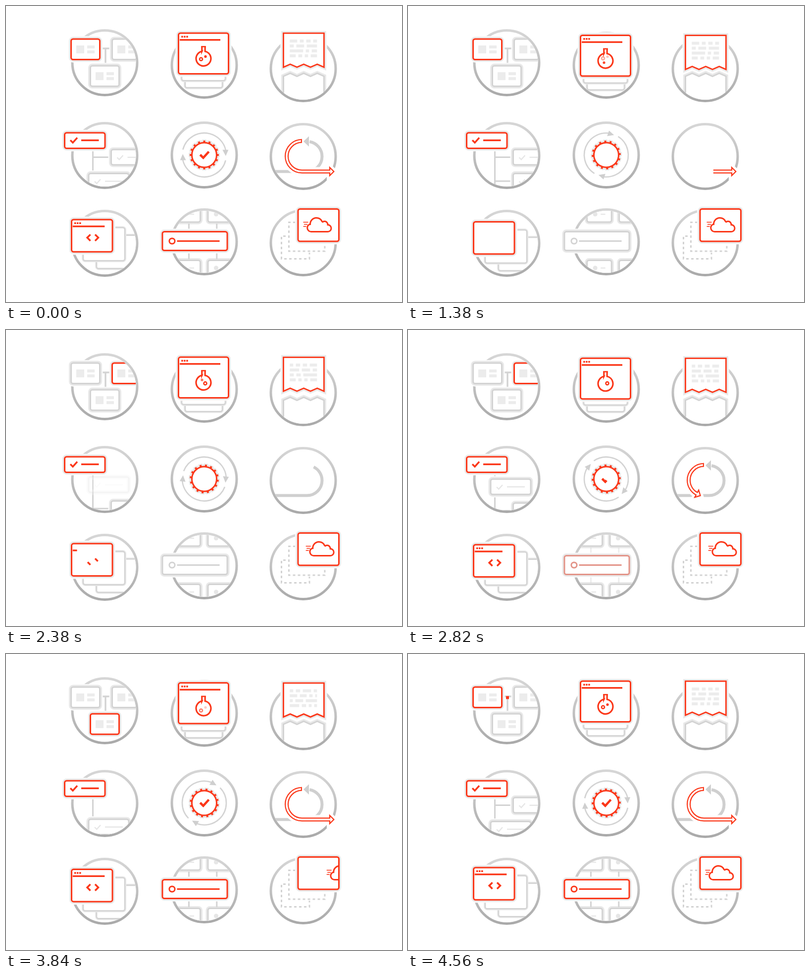
Recreate the animation shown at these times as an HTML page with a canvas. Size 800 by 600 pixels, loop 4580 ms.

```html
<!DOCTYPE html>
<html lang="en">
<head>
<meta charset="utf-8">
<title>Line icons</title>
<style>
html, body { margin: 0; width: 100%; height: 100%; overflow: hidden; background: #fff; }
canvas { display: block; width: 800px; height: 600px; }
</style>
</head>
<body>
<canvas id="stage" width="800" height="600"></canvas>
<script>
const ctx = document.getElementById('stage').getContext('2d');
const LOOP = 4580, TAU = Math.PI * 2, RAD = Math.PI / 180;
const RED = '#fb3719', GREY = '#d3d3d3', PALE = '#ececec', HALO = '#e9e9e9', WHITE = '#fff';

const ramp = (t, a, b) => Math.min(1, Math.max(0, (t - a) / (b - a)));
const ease = (t, a, b) => { const k = ramp(t, a, b); return k * k * (3 - 2 * k); };
const lerp = (a, b, k) => a + (b - a) * k;
const tint = k => `rgb(${lerp(211, 251, k)},${lerp(211, 55, k)},${lerp(211, 25, k)})`;
const bob = (t, lag = 0) => 2.5 * (1 - Math.cos(TAU * (t * 2 / LOOP - lag)));

function keyed(t, keys) {
  let i = 1;
  while (i < keys.length - 1 && t > keys[i][0]) i++;
  const [a, from] = keys[i - 1], [b, to] = keys[i];
  return lerp(from, to, ramp(t, a, b));
}

function scoped(draw) {
  ctx.save();
  draw();
  ctx.restore();
}

function stroke(color, width) {
  ctx.strokeStyle = color;
  ctx.lineWidth = width;
  ctx.stroke();
}

function line(points, color, width) {
  ctx.beginPath();
  points.forEach(([x, y]) => ctx.lineTo(x, y));
  stroke(color, width);
}

// Strokes only the stretch of the path between two lengths.
function stretch(path, from, to, color, width) {
  if (to <= from) return;
  scoped(() => {
    ctx.setLineDash([to - from, 9999]);
    ctx.lineDashOffset = -from;
    ctx.beginPath();
    path();
    stroke(color, width);
  });
}

function box(x, y, w, h, color) {
  ctx.fillStyle = color;
  ctx.fillRect(x, y, w, h);
}

function disc(x, y, r, color) {
  ctx.fillStyle = color;
  ctx.beginPath();
  ctx.arc(x, y, r, 0, TAU);
  ctx.fill();
}

function circle(x, y, r, color, width) {
  ctx.beginPath();
  ctx.arc(x, y, r, 0, TAU);
  stroke(color, width);
}

function outlined(path, color, width = 3, halo = 9, gap = 12) {
  ctx.beginPath();
  path();
  if (gap) stroke(WHITE, gap);
  stroke(HALO, halo);
  ctx.fillStyle = WHITE;
  ctx.fill();
  stroke(color, width);
}

const panel = (x, y, w, h, color) => outlined(() => ctx.roundRect(x, y, w, h, 4), color);
const backCard = (x, y, w, h) => outlined(() => ctx.roundRect(x, y, w, h, 4), GREY, 2.6, 6, 0);

function ring(cx, cy) {
  const shade = ctx.createLinearGradient(0, cy - 68, 0, cy + 68);
  shade.addColorStop(0, '#d7d7d7');
  shade.addColorStop(1, '#a9a9a9');
  circle(cx, cy, 65.5, shade, 5);
}

function inside(cx, cy, draw) {
  scoped(() => {
    ctx.beginPath();
    ctx.arc(cx, cy, 63, 0, TAU);
    ctx.clip();
    draw();
  });
}

function tick(x, y, size, color, width, shown = 1) {
  stretch(() => {
    ctx.moveTo(x - 7 * size, y);
    ctx.lineTo(x - 2 * size, y + 5 * size);
    ctx.lineTo(x + 7 * size, y - 5 * size);
  }, 0, 21 * size * shown, color, width);
}

function titleBar(x, y, length, dots) {
  scoped(() => {
    ctx.globalAlpha = dots;
    for (let i = 0; i < 3; i++) box(x + 6.2 + i * 5, y + 5.5, 3.5, 3.5, RED);
  });
  if (length > 0) box(x + 3, y + 12, length, 3.4, RED);
}

function network(t) {
  const cx = 199.5, cy = 115;
  const ab = ramp(t, 1540, 1680), bc = ramp(t, 3030, 3170), ca = ramp(t, 4380, 4500);
  const card = (x, y, k) => {
    panel(x, y, 58, 41.5, tint(k));
    box(x + 10.5, y + 13, 16, 16, PALE);
    box(x + 32.5, y + 13, 15, 6, PALE);
    box(x + 32.5, y + 23, 15, 6, PALE);
  };
  const dot = (x, y) => box(x - 3, y - 3, 6, 6, RED);
  ring(cx, cy);
  inside(cx, cy, () => {
    line([[190, 86], [214, 86]], GREY, 3.4);
    line([[201, 86], [201, 120]], GREY, 3.4);
    if (t > 1560 && t < 1760) dot(lerp(188, 216, ramp(t, 1560, 1760)), 86);
    if (t > 3050 && t < 3300) {
      const way = 50 * ramp(t, 3050, 3300);
      dot(Math.max(201, 215 - way), 86 + Math.max(0, way - 14));
    }
    if (t > 4410) dot(201, lerp(121, 86, ramp(t, 4410, 4572)));
    card(214.5, 67, ab * (1 - bc));
    card(170.5, 121.2, bc * (1 - ca));
  });
  card(131.5, 67, Math.max(1 - ab, ca));
}

function bubble(t, start, life, x, fromY, toY, hollow) {
  const k = ((t - start + LOOP) % LOOP) / life;
  if (k > 1) return;
  scoped(() => {
    ctx.globalAlpha = Math.min(1, k / 0.15, (1 - k) / 0.13);
    const y = lerp(fromY, toY, k);
    if (hollow) circle(x, y, 3, RED, 2.6);
    else disc(x, y, 2.6, RED);
  });
}

function flaskWindow(t) {
  ring(400.5, 120);
  const low = bob(t, 0.12), mid = bob(t, 0.08);
  inside(400.5, 120, () => {
    backCard(362, 115 + low, 75, 50);
    backCard(355, 100 + mid, 88, 51);
  });
  scoped(() => {
    ctx.translate(0, bob(t));
    panel(348.5, 55, 101, 82.5, RED);
    titleBar(348, 55, 82, 1);
    ctx.beginPath();
    ctx.moveTo(395.8, 82);
    ctx.lineTo(395.8, 92);
    ctx.arc(399, 106.5, 15, -102 * RAD, -78 * RAD, true);
    ctx.lineTo(402.2, 82);
    stroke(RED, 3.2);
    line([[394.2, 82.3], [403.8, 82.3]], RED, 2.6);
    bubble(t, 3600, 2500, 394, 112, 101, true);
    bubble(t, 3750, 2300, 403, 105, 98, false);
    bubble(t, 1200, 1300, 396, 112, 100, false);
    bubble(t, 1900, 1500, 402.5, 110.5, 103, true);
  });
}

// Gap positions of the four text rows, for each of three texts.
const TEXTS = [
  [[15, 28, 42], [8, 29, 55], [27, 39, 55], [12, 25, 37]],
  [[7, 21, 35], [19, 41, 55], [8, 22, 55], [12, 24, 36]],
  [[7, 21, 43], [15, 34, 46], [6, 27, 55], [19, 33, 44]]
];

function tornEdge(y, toRight) {
  for (let i = 0; i <= 6; i++) {
    const n = toRight ? i : 6 - i;
    ctx.lineTo(560.5 + n * 13.65, y - (n % 2) * 6);
  }
}

function receipt(t) {
  ring(600.5, 127);
  inside(600.5, 127, () => outlined(() => {
    ctx.moveTo(560.5, 210);
    tornEdge(142.5, true);
    ctx.lineTo(642.4, 210);
  }, GREY, 3, 9, 0));
  scoped(() => {
    ctx.translate(0, bob(t));
    outlined(() => {
      ctx.moveTo(560.5, 55.2);
      ctx.lineTo(642.4, 55.2);
      tornEdge(124, false);
      ctx.closePath();
    }, RED, 2.8);
    const [a, b, c] = [ease(t, 1650, 1950), ease(t, 2750, 3050), ease(t, 4100, 4400)];
    for (let row = 0; row < 4; row++) {
      let x = 0;
      for (let i = 0; i < 4; i++) {
        const [p, q, r] = TEXTS.map(text => i < 3 ? text[row][i] : 55);
        const end = lerp(lerp(lerp(p, q, a), r, b), p, c);
        if (end > x) box(573.3 + x, 68 + row * 10, end - x, 6, PALE);
        x = end + 5.3;
      }
    }
  });
}

const SCROLL = [[0, 0], [200, 10], [640, 37], [1000, 47], [1300, 48.5], [1500, 48.5], [2200, 95],
  [2380, 104], [2900, 109], [3280, 118], [3840, 141], [4150, 145.5], [4580, 145.5]];

function taskTree(t) {
  const cx = 199.5, cy = 303, shift = keyed(t, SCROLL);
  const fades = [1, ramp(t, 1050, 1350), ramp(t, 2310, 2700), ramp(t, 4150, 4450)];
  ring(cx, cy);
  inside(cx, cy, () => {
    line([[175.5, 285], [175.5, 375]], GREY, 3);
    for (let i = -2; i <= 3; i++) {
      const y = 291 + shift - i * 48.5, left = (i + 3) % 3 === 2, x = left ? 167 : 212.5;
      scoped(() => {
        ctx.globalAlpha = i > 0 ? fades[i] : 1;
        if (!left) line([[176, y + 15.5], [211, y + 15.5]], GREY, 3);
        panel(x, y, 81, 31, GREY);
        tick(x + 18, y + 16, 0.85, '#e6e6e6', 2.4);
        box(x + 33, y + 14.5, 36, 2.4, '#e6e6e6');
      });
    }
  });
  panel(118.5, 257, 81.5, 31.5, RED);
  tick(137, 272, 1, RED, 3.4);
  box(152, 270.5, 35.5, 3.5, RED);
}

function gear(t) {
  const cx = 400.5, cy = 302, turn = TAU * t / LOOP;
  ring(cx, cy);
  scoped(() => {
    ctx.translate(cx, cy);
    scoped(() => {
      ctx.rotate(turn);
      for (let i = 0; i < 2; i++) {
        ctx.beginPath();
        ctx.arc(0, 0, 44.5, -166 * RAD, -12 * RAD);
        stroke(GREY, 2.6);
        ctx.fillStyle = '#cfcfcf';
        ctx.beginPath();
        ctx.moveTo(36.8, -10.5);
        ctx.lineTo(48.8, -10.5);
        ctx.lineTo(43.4, 2);
        ctx.fill();
        ctx.rotate(Math.PI);
      }
    });
    ctx.rotate(turn);
    const cog = (color, r, width, reach, tooth) => {
      circle(0, 0, r, color, width);
      for (let i = 0; i < 16; i++) {
        box(-tooth / 2, -reach, tooth, reach - r, color);
        ctx.rotate(TAU / 16);
      }
    };
    cog(HALO, 25.5, 9, 31.5, 8);
    disc(0, 0, 25, WHITE);
    cog(RED, 25, 3, 29.3, 4);
  });
  tick(cx + 0.5, cy - 0.5, 1.25, RED, 4.6, ramp(t, 2700, 2950) + 1 - ramp(t, 280, 520));
}

const BEND = Math.PI * 31, COURSE = BEND + 56;

function loopArrow(t) {
  const cx = 600.5, cy = 305;
  const greyPath = () => {
    ctx.moveTo(536, 335.5);
    ctx.lineTo(608, 335.5);
    ctx.arc(608, 305, 30.5, 90 * RAD, -80 * RAD, true);
  };
  const redPath = () => {
    ctx.arc(598, 304.5, 31, -90 * RAD, 90 * RAD, true);
    ctx.lineTo(655, 335.5);
  };
  ring(cx, cy);
  inside(cx, cy, () => {
    if (t < 1000) stretch(greyPath, 163 * ramp(t, 200, 765), 163, '#cfcfcf', 6);
    else stretch(greyPath, 0, 163 * ramp(t, 1750, 2420), '#cfcfcf', 6);
    if (t < 800 || t > 2420) {
      ctx.fillStyle = '#cfcfcf';
      ctx.beginPath();
      ctx.moveTo(601, 274.5);
      ctx.lineTo(612, 264);
      ctx.lineTo(612, 285);
      ctx.fill();
    }
  });
  const tail = t < 2000 ? COURSE * ramp(t, 700, 1600) : 0;
  const tip = t < 2000 ? COURSE : COURSE * ramp(t, 2500, 3100);
  if (t > 1650 && t < 2500) return;
  stretch(redPath, tail, tip, WHITE, 18);
  const head = () => {
    ctx.moveTo(0, -8.3);
    ctx.lineTo(8.3, 0);
    ctx.lineTo(0, 8.3);
    ctx.closePath();
  };
  const angle = -Math.PI / 2 - Math.min(tip, BEND) / 31;
  scoped(() => {
    ctx.translate(598 + 31 * Math.cos(angle) + Math.max(0, tip - BEND), 304.5 + 31 * Math.sin(angle));
    ctx.rotate(angle - Math.PI / 2);
    ctx.beginPath();
    head();
    stroke(WHITE, 12);
    ctx.fillStyle = WHITE;
    ctx.fill();
    stroke(RED, 2.3);
  });
  stretch(redPath, tail, tip, RED, 8);
  stretch(redPath, tail || 2.2, tip + 1.5, WHITE, 3.6);
}

function codeWindow(t) {
  ring(199.5, 481);
  const low = bob(t, 0.12), mid = bob(t, 0.08);
  inside(199.5, 481, () => {
    backCard(183, 464 + low, 90, 67.5);
    backCard(156, 449 + mid, 84, 67);
  });
  scoped(() => {
    ctx.translate(0, bob(t));
    panel(132.5, 433, 82.5, 65.3, RED);
    const bar = t < 1500 ? 1 - ramp(t, 400, 800) : ramp(t, 2300, 2900);
    const dots = t < 1500 ? 1 - ramp(t, 480, 700) : ramp(t, 2500, 2800);
    const code = t < 1500 ? 1 - ramp(t, 700, 1050) : ramp(t, 2200, 2620);
    titleBar(131.8, 433, 64.5 * bar, dots);
    const bracket = (x, y, dir) => stretch(() => {
      ctx.moveTo(x, y);
      ctx.lineTo(x - 6.4 * dir, y - 6.4 * dir);
      ctx.lineTo(x, y - 12.8 * dir);
    }, 0, 18.2 * code, RED, 3.6);
    bracket(170.5, 476, 1);
    bracket(180, 463.2, -1);
  });
}

function carousel(t) {
  const cx = 400.5, cy = 478, shift = 65 * ease(t, 850, 2350);
  const lit = t < 1500 ? 1 - ramp(t, 300, 560) : ramp(t, 2700, 3000);
  const color = tint(lit);
  ring(cx, cy);
  inside(cx, cy, () => {
    for (let i = -2; i < 3; i++) {
      const x = 343 + i * 65 + shift;
      for (const [y, mark] of [[391, 422], [515.5, 531]]) {
        panel(x, y, 49.5, 47, GREY);
        disc(x + 16.5, mark, 4.5, '#e6e6e6');
        box(x + 27.5, mark - 1, 9.5, 2.2, '#e6e6e6');
      }
    }
    ctx.globalAlpha = lit;
    for (const x of [369.5, 425.8]) {
      line([[x, 441], [x, 456]], GREY, 3);
      line([[x, 497], [x, 513]], GREY, 3);
    }
  });
  panel(316, 457.5, 131, 38, color);
  circle(335.5, 476.5, 5.6, color, 3);
  box(345.5, 475, 86, 3, color);
}

const DRIFT = [[0, 0], [3300, 7.2], [3600, 15], [3840, 47], [3980, 75]];

function cloudWindow(t) {
  ring(600.5, 480);
  scoped(() => {
    ctx.setLineDash([5, 5]);
    line([[585, 438.5], [571.5, 438.5], [571.5, 497], [644, 497], [644, 478]], GREY, 3);
    line([[565, 466.5], [556.5, 466.5], [556.5, 512.5], [613, 512.5], [613, 500]], GREY, 3);
  });
  panel(590, 411.5, 82.5, 65.5, RED);
  scoped(() => {
    ctx.beginPath();
    ctx.rect(591, 413, 80, 62);
    ctx.clip();
    const back = ramp(t, 3980, 4520);
    ctx.translate(t < 3980 ? keyed(t, DRIFT) : -75 * (1 - back) ** 2, 0);
    ctx.beginPath();
    ctx.arc(616.5, 449.7, 7.8, 90 * RAD, 250 * RAD);
    ctx.arc(627, 442, 12.5, 178 * RAD, 335 * RAD);
    ctx.arc(643.5, 443, 6.5, 235 * RAD, 360 * RAD);
    ctx.arc(650, 450.5, 7, 270 * RAD, 90 * RAD);
    ctx.closePath();
    stroke(RED, 3);
    box(600.5, 437.5, 10, 1.6, RED);
    box(602, 441.8, 7, 1.6, RED);
    box(600.5, 446, 6, 1.6, RED);
  });
}

const icons = [network, flaskWindow, receipt, taskTree, gear, loopArrow, codeWindow, carousel, cloudWindow];

function render() {
  box(0, 0, 800, 600, WHITE);
  const t = performance.now() % LOOP;
  icons.forEach(icon => icon(t));
  requestAnimationFrame(render);
}
render();
</script>
</body>
</html>
```
